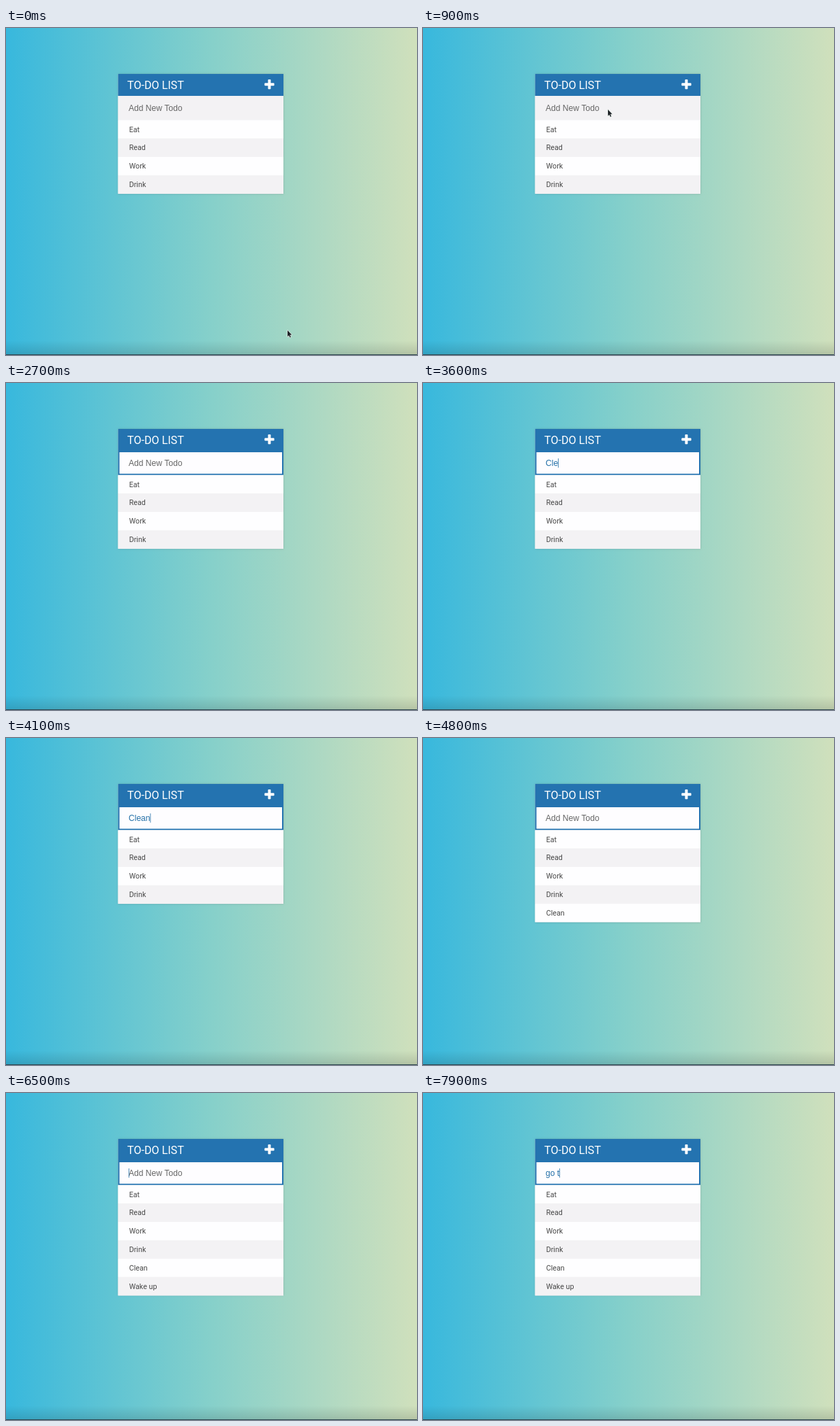
An HTML page with a canvas for the animation above (8000 ms loop, 600x477 px).

```html
<!DOCTYPE html>
<html lang="en">
<head>
<meta charset="utf-8">
<title>To-do list</title>
<style>
html, body { margin: 0; width: 100%; height: 100%; overflow: hidden; }
canvas { display: block; width: 600px; height: 477px; }
</style>
</head>
<body>
<canvas id="stage" width="600" height="477"></canvas>
<script>
const ctx = document.getElementById('stage').getContext('2d');
const LOOP = 8000, STEP = 100;
const BLUE = '#2473b0', STRIPE = '#f3f2f4';
const LEFT = 163.6, WIDTH = 241.4, TOP = 67, INPUT_TOP = 99, LIST_TOP = 134.4, ROW = 26.83;
const FOCUS_AT = 1000, HIDE_POINTER_AT = 1600, BLINK = 500;

// Times at which the input's text changes.
const typing = [
  [FOCUS_AT, ''], [1600, 'c'], [2200, ''],
  [2900, 'C'], [3200, 'Cl'], [3500, 'Cle'], [3800, 'Clea'], [4000, 'Clean'], [4250, ''],
  [5100, 'W'], [5300, 'Wa'], [5500, 'Wak'], [5600, 'Wake'], [5800, 'Wake '],
  [6000, 'Wake u'], [6100, 'Wake up'], [6400, ''],
  [7400, 'g'], [7600, 'go'], [7700, 'go '], [7900, 'go t']
];
const todos = [
  [0, 'Eat'], [0, 'Read'], [0, 'Work'], [0, 'Drink'], [4250, 'Clean'], [6400, 'Wake up']
];

function rect(x, y, w, h, color) {
  ctx.fillStyle = color;
  ctx.fillRect(x, y, w, h);
}

function text(str, x, y, font, color) {
  ctx.font = font;
  ctx.fillStyle = color;
  ctx.fillText(str, x, y);
}

function drawBackground() {
  const sky = ctx.createLinearGradient(0, 0, 600, 0);
  sky.addColorStop(0, '#38b8dd');
  sky.addColorStop(0.5, '#86d0ca');
  sky.addColorStop(1, '#d0e0bc');
  rect(0, 0, 600, 477, sky);
  const shade = ctx.createLinearGradient(0, 456, 0, 476);
  shade.addColorStop(0, 'rgba(0,0,0,0)');
  shade.addColorStop(1, 'rgba(0,0,0,0.13)');
  rect(0, 456, 600, 20, shade);
  rect(0, 476, 600, 1, '#2c4750');
}

function drawHeader() {
  rect(LEFT, TOP, WIDTH, INPUT_TOP - TOP, BLUE);
  text('TO-DO LIST', 177, 88.5, '16.1px Roboto, sans-serif', '#fff');
  ctx.fillStyle = '#fff';
  ctx.beginPath();
  ctx.roundRect(377.4, 80.2, 14.2, 4, 1);
  ctx.roundRect(382.5, 75.1, 4, 14.2, 1);
  ctx.fill();
}

function drawInput(t) {
  const focused = t >= FOCUS_AT;
  const height = LIST_TOP - INPUT_TOP;
  rect(LEFT, INPUT_TOP, WIDTH, height, focused ? BLUE : STRIPE);
  if (focused) rect(LEFT + 2, INPUT_TOP + 2, WIDTH - 4, height - 4, '#fefdff');

  const [since, value] = typing.findLast(([at]) => t >= at) || [0, ''];
  const font = '12.06px "Liberation Sans", Arial, sans-serif';
  text(value || 'Add New Todo', 179, 120.8, font, value ? '#2470a8' : '#666');
  if (focused && Math.floor((t - since) / BLINK) % 2 === 0) {
    rect(179 + ctx.measureText(value).width, 110, 0.8, 13.5, '#2470a8');
  }
}

function drawList(items) {
  items.forEach(([, label], i) => {
    const y = LIST_TOP + i * ROW;
    rect(LEFT, y, WIDTH, ROW, i % 2 ? STRIPE : '#fefeff');
    text(label, 179.7, y + 17.1, '10.72px Roboto, sans-serif', '#484848');
  });
}

function drawPointer(t) {
  if (t >= HIDE_POINTER_AT) return;
  const p = Math.min(t / 900, 1);
  const ease = p * p * (3 - 2 * p);
  ctx.save();
  ctx.translate(411 - 141 * ease, 441 - 322 * ease);
  ctx.beginPath();
  [[0, 0], [0, 9.2], [2, 7.3], [3.4, 10.5], [4.9, 9.9], [3.5, 6.8], [6.2, 6.6]]
    .forEach(([x, y]) => ctx.lineTo(x, y));
  ctx.closePath();
  ctx.lineJoin = 'round';
  ctx.lineWidth = 1.3;
  ctx.strokeStyle = '#e6eeea';
  ctx.stroke();
  ctx.fillStyle = '#202428';
  ctx.fill();
  ctx.restore();
}

function draw(t) {
  const items = todos.filter(([at]) => t >= at);
  drawBackground();
  ctx.save();
  ctx.shadowColor = 'rgba(0,0,0,0.2)';
  ctx.shadowBlur = 2.5;
  rect(LEFT, TOP, WIDTH, LIST_TOP - TOP + items.length * ROW, STRIPE);
  ctx.restore();
  drawHeader();
  drawInput(t);
  drawList(items);
  drawPointer(t);
}

const start = performance.now();
function tick() {
  const t = (performance.now() - start) % LOOP;
  draw(Math.floor(t / STEP) * STEP);
  requestAnimationFrame(tick);
}
tick();
</script>
</body>
</html>
```
